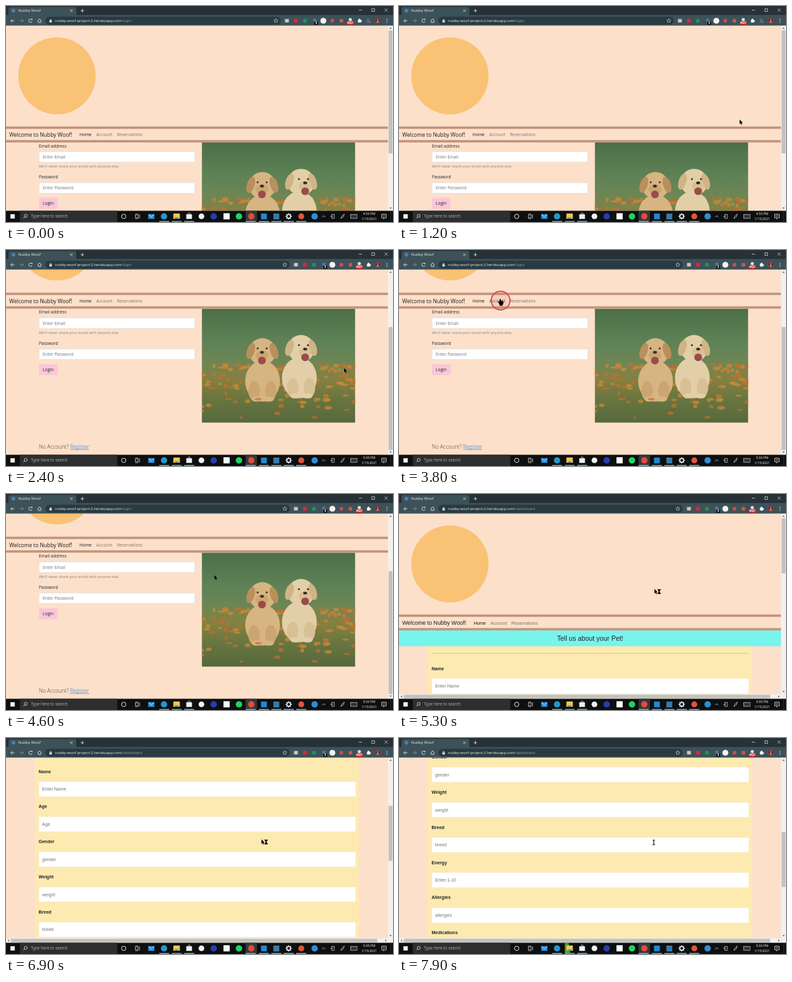
Write an HTML page with a canvas that moves like this. It is 600 px wide and 337 px high and loops after 8 s.

```html
<!DOCTYPE html>
<html lang="en">
<head>
<meta charset="utf-8">
<title>Nubby Woof</title>
<style>
html, body { margin: 0; width: 100%; height: 100%; overflow: hidden; background: #fce0ca; }
canvas { display: block; width: 600px; height: 337px; }
</style>
</head>
<body>
<canvas id="stage"></canvas>
<script>
const W = 600, H = 337, LOOP = 8000;
const canvas = document.getElementById('stage');
const ctx = canvas.getContext('2d');
const dpr = window.devicePixelRatio || 1;
canvas.width = W * dpr;
canvas.height = H * dpr;

const UI = '"Open Sans", "Noto Sans", sans-serif';
const ARIAL = '"Liberation Sans", Arial, sans-serif';
const BRAND = 'Nubby Woof';
const PAGE = '#fce0ca';
const RULE = '#c2947f';
const INK = '#212529';
const MUTED = '#6c757d';
const CHROME = '#3d5159';
const VIEW_TOP = 30.5, BAR_TOP = 319.5;

// Times of the main events, in ms
const CLOCK_AT = 1800, CLICK_AT = 3650, LOAD_AT = 4620;
const LOGIN_WHEEL = { from: 1300, gap: 160, count: 3 };
const DASH_WHEEL = { from: 5560, gap: 300, count: 8 };
const MOVES = [
  [300, 604, 260], [1000, 528, 177], [1250, 528, 177], [1900, 524, 184],
  [2700, 524, 184], [3550, 157, 77], [4000, 157, 77], [4950, 396, 148],
  [5400, 396, 148], [6500, 396, 158], [7000, 396, 158], [7500, 395, 163]
];

const clamp = v => Math.max(0, Math.min(1, v));
const ease = v => v * v * (3 - 2 * v);
function wheel({ from, gap, count }, t) {
  let sum = 0;
  for (let i = 0; i < count; i++) sum += 44 * ease(clamp((t - from - i * gap) / 140));
  return sum;
}

function pointer(t) {
  let a = MOVES[0];
  for (const b of MOVES) {
    if (t < b[0]) {
      const k = ease(clamp((t - a[0]) / (b[0] - a[0])));
      return [a[1] + (b[1] - a[1]) * k, a[2] + (b[2] - a[2]) * k];
    }
    a = b;
  }
  return [a[1], a[2]];
}

function rect(x, y, w, h, fill) {
  ctx.fillStyle = fill;
  ctx.fillRect(x, y, w, h);
}
function round(x, y, w, h, r, fill, stroke) {
  ctx.beginPath();
  ctx.roundRect(x, y, w, h, r);
  ctx.fillStyle = fill;
  ctx.fill();
  if (stroke) {
    ctx.strokeStyle = stroke;
    ctx.lineWidth = 0.5;
    ctx.stroke();
  }
}
function oval(x, y, rx, ry, fill, angle = 0) {
  ctx.beginPath();
  ctx.ellipse(x, y, rx, ry, angle, 0, Math.PI * 2);
  ctx.fillStyle = fill;
  ctx.fill();
}
const disc = (x, y, r, fill) => oval(x, y, r, r, fill);
function ring(x, y, r, color, width = 0.9) {
  ctx.beginPath();
  ctx.arc(x, y, r, 0, Math.PI * 2);
  ctx.strokeStyle = color;
  ctx.lineWidth = width;
  ctx.stroke();
}
function trace(points) {
  ctx.beginPath();
  points.forEach(([x, y], i) => i ? ctx.lineTo(x, y) : ctx.moveTo(x, y));
}
function line(points, color, width = 0.9) {
  trace(points);
  ctx.strokeStyle = color;
  ctx.lineWidth = width;
  ctx.stroke();
}
function poly(points, fill) {
  trace(points);
  ctx.fillStyle = fill;
  ctx.fill();
}
// y is the middle of the capitals
function text(str, x, y, size, color, family = UI, weight = 400, align = 'left') {
  ctx.font = `${weight} ${size}px ${family}`;
  ctx.textAlign = align;
  ctx.fillStyle = color;
  ctx.fillText(str, x, y + size * 0.36);
  return ctx.measureText(str).width;
}

function makeRandom(seed) {
  return () => (seed = (seed * 16807) % 2147483647) / 2147483647;
}

function puppy(x, y, coat, shade, ear, lean) {
  oval(x - 3 * lean, y + 46, 27, 32, coat);
  oval(x - 13, y + 61, 9, 15, shade);
  oval(x + 13, y + 61, 9, 15, shade);
  oval(x - 9, y + 74, 8, 4, coat);
  oval(x + 10, y + 74, 8, 4, coat);
  oval(x, y, 21, 21, coat);
  oval(x - 18, y - 1, 6, 13, ear, 0.3);
  oval(x + 18, y - 1, 6, 13, ear, -0.3);
  oval(x + 7 * lean, y + 6, 10, 8, shade);
  oval(x + 7 * lean, y + 14, 6, 6, '#9c4a4c');
  oval(x + 7 * lean, y + 1, 3, 2.2, '#3a2a22');
  disc(x - 7 + 4 * lean, y - 5, 1.5, '#3a2a22');
  disc(x + 7 + 4 * lean, y - 5, 1.5, '#3a2a22');
}

function photo(x, y) {
  ctx.save();
  ctx.translate(x, y);
  ctx.beginPath();
  ctx.rect(0, 0, 238, 178);
  ctx.clip();
  const g = ctx.createLinearGradient(0, 0, 0, 178);
  g.addColorStop(0, '#4b6f48');
  g.addColorStop(0.3, '#5f8256');
  g.addColorStop(0.48, '#6f8654');
  g.addColorStop(0.62, '#86803f');
  g.addColorStop(0.8, '#67753f');
  g.addColorStop(1, '#56683d');
  rect(0, 0, 238, 178, g);
  const rnd = makeRandom(71);
  const flower = low => {
    const fx = rnd() * 238, fy = low + rnd() * rnd() * 70;
    oval(fx, fy, 2 + rnd() * 4, 1.5 + rnd() * 2, rnd() < 0.5 ? 'rgba(206,138,56,.7)' : 'rgba(196,112,46,.7)');
  };
  for (let i = 0; i < 130; i++) flower(87);
  puppy(154, 62, '#e2cfa8', '#d8c096', '#d0b486', 0.9);
  puppy(94, 67, '#d6b582', '#cba670', '#b98f5c', -0.1);
  for (let i = 0; i < 22; i++) flower(140);
  ctx.restore();
}

function header(dash, hover) {
  const face = dash ? ARIAL : UI;
  const size = dash ? 7.03 : 6.65;
  const dx = dash ? 2 : 0;
  disc(79, 109, 60, '#fac274');
  rect(0, 188, 592.5, 3.7, RULE);
  rect(0, 209.2, 592.5, 3.7, RULE);
  text(`Welcome to ${BRAND}!`, 5, 201, dash ? 8.78 : 8.25, '#1c1a19', face);
  text('Home', 114 + dx, 201, size, '#1c1a19', face);
  text('Account', 140 + dx, 201, size, hover ? '#4d443d' : '#80726a', face);
  text('Reservations', 172 + dx, 201, size, '#80726a', face);
}

function input(label, y) {
  round(51.2, y, 241.6, 16.3, 1.8, '#fff', '#ced4da');
  text(label, 57, y + 8.3, 6.6, MUTED);
}

function loginPage(scroll, hover) {
  ctx.translate(0, -scroll);
  header(false, hover);
  text('Email address', 51, 218.2, 6.6, INK);
  input('Enter Email', 227.3);
  text("We'll never share your email with anyone else.", 51, 250.2, 5.8, '#82807e');
  text('Password', 51, 267, 6.6, INK);
  input('Enter Password', 275.8);
  round(51, 299.6, 29, 17, 1.8, '#fbc6d8');
  text('Login', 57, 308, 6.6, INK);
  const w = text('No Account? ', 51, 428, 8.2, '#3a3836', UI, 300);
  const link = text('Register', 51 + w, 428, 8.2, '#1f77d0', UI, 300);
  rect(51 + w, 432.2, link, 0.6, '#1f77d0');
  photo(303.5, 213);
}

const FIELDS = [
  ['Name', 'Enter Name'], ['Age', 'Age'], ['Gender', 'gender'], ['Weight', 'weight'],
  ['Breed', 'breed'], ['Energy', 'Enter 1-10'], ['Allergies', 'allergies'],
  ['Medications', 'medications']
];

function dashPage(scroll) {
  ctx.translate(0, -scroll);
  rect(45, 237, 502, 700, '#fdeab1');
  header(true, false);
  rect(0, 212.9, 592.5, 24.6, '#77f4eb');
  text('Tell us about your Pet!', 296.3, 225.2, 10.4, INK, ARIAL, 400, 'center');
  ctx.setLineDash([1, 0.9]);
  line([[50.5, 248.7], [542, 248.7]], '#a89b74', 0.8);
  ctx.setLineDash([]);
  FIELDS.forEach(([label, hint], i) => {
    const y = 272 + i * 54.8;
    text(label, 50.5, y, 7.03, INK, ARIAL, 700);
    round(51, y + 16, 491.3, 23.4, 0.8, '#fff', '#ece6d3');
    text(hint, 56, y + 27.6, 7.03, '#757575', ARIAL);
  });
}

function scrollbars(dash, scroll) {
  const foot = dash ? 312.5 : BAR_TOP;
  rect(592.5, VIEW_TOP, 7.5, BAR_TOP - VIEW_TOP, '#f1f1f1');
  const top = dash ? 38 + scroll * 0.308 : 38 + scroll * 0.677;
  rect(593.2, top, 6, dash ? 86 : 192, '#c1c1c1');
  poly([[594.4, 35.4], [598, 35.4], [596.2, 33.4]], '#505050');
  poly([[594.4, foot - 5], [598, foot - 5], [596.2, foot - 3]], '#505050');
  if (!dash) return;
  rect(0, 312.5, 592.5, 7, '#f1f1f1');
  rect(7.5, 313.2, 568, 5.6, '#c1c1c1');
  poly([[4.6, 314.2], [4.6, 317.8], [2.6, 316]], '#505050');
  poly([[588, 314.2], [588, 317.8], [590, 316]], '#505050');
}

function star(x, y, r, color) {
  const pts = [];
  for (let i = 0; i <= 10; i++) {
    const a = i * Math.PI / 5 - Math.PI / 2, q = i % 2 ? r * 0.45 : r;
    pts.push([x + q * Math.cos(a), y + q * Math.sin(a)]);
  }
  line(pts, color, 0.6);
}

function browser(dash, late) {
  const pale = '#dfe3e5';
  rect(0, 0, W, 15, '#263238');
  round(4, 1.5, 105, 16, 3, CHROME);
  rect(0, 14, W, VIEW_TOP - 14, CHROME);
  disc(11.5, 7.3, 3, '#4a7fae');
  text(BRAND, 19, 7.3, 6, '#eef1f2');
  line([[99.5, 5.4], [103.3, 9.2]], pale, 0.8);
  line([[103.3, 5.4], [99.5, 9.2]], pale, 0.8);
  line([[115.8, 7.3], [121, 7.3]], pale);
  line([[118.4, 4.7], [118.4, 9.9]], pale);
  line([[547, 6.5], [552, 6.5]], pale, 0.7);
  ctx.strokeRect(567.2, 4.2, 4.4, 4.4);
  line([[587, 4], [591.8, 8.8]], pale, 0.7);
  line([[591.8, 4], [587, 8.8]], pale, 0.7);

  line([[13, 23], [7.5, 23]], pale);
  line([[10, 20.4], [7.4, 23], [10, 25.6]], pale);
  line([[21.5, 23], [27, 23]], '#899094');
  line([[24.5, 20.4], [27.1, 23], [24.5, 25.6]], '#899094');
  ctx.beginPath();
  ctx.arc(38, 23, 2.6, 0.3, 5.5);
  ctx.strokeStyle = pale;
  ctx.lineWidth = 0.9;
  ctx.stroke();
  poly([[38.6, 21.8], [41, 21.8], [41, 19.5]], pale);
  line([[49, 23], [52, 20], [55, 23]], pale);
  line([[50, 22.5], [50, 25.7], [54, 25.7], [54, 22.5]], pale);

  const dx = late ? 0 : -14;
  round(61, 16.8, 379 + dx, 12.2, 6.1, '#293a41');
  rect(67.3, 22.4, 3.8, 3.2, pale);
  ctx.beginPath();
  ctx.arc(69.2, 22.3, 1.3, Math.PI, 0);
  ctx.stroke();
  const w = text('nubby-woof-project-2.herokuapp.com', 76, 22.9, 5.85, '#f1f3f4');
  text(dash ? '/dashboard' : '/login', 76 + w, 22.9, 5.85, '#9aa0a6');

  ctx.save();
  ctx.translate(dx, 0);
  star(432.3, 23, 3.4, pale);
  rect(446.5, 20.3, 6, 5.4, '#d3c5bd');
  disc(463.3, 23, 3.2, '#d92a2f');
  disc(477.4, 23, 3, '#159c53');
  disc(492.5, 22, 2.6, '#5d7590');
  round(492, 24.2, 6, 5, 1, '#111');
  text('0', 495, 26.8, 4.4, '#fff', UI, 700, 'center');
  disc(506, 23, 4.6, '#f4f4f4');
  disc(520, 23, 2.9, '#d4484a');
  disc(534, 23, 3, '#c65a48');
  disc(547.7, 21.3, 2.5, '#e0e0e0');
  round(542.3, 23.9, 11, 5.4, 1, '#d8232a');
  text('4421', 547.8, 26.7, 4.3, '#fff', UI, 700, 'center');
  rect(559.6, 21.2, 4.8, 4.6, '#f0f0f0');
  disc(562, 21, 1.2, '#f0f0f0');
  disc(564.6, 23.5, 1.2, '#f0f0f0');
  ctx.restore();
  if (!late) {
    for (let i = 0; i < 3; i++) line([[559.5, 21 + i * 2], [563.4 - (i > 1 ? 1 : 0), 21 + i * 2]], '#9ba1a4', 0.7);
    disc(564.3, 25, 0.9, '#9ba1a4');
  }
  disc(576.3, 23, 4.4, '#2b2426');
  ring(576.3, 23, 3.8, '#b8403f', 1.2);
  disc(576.3, 22, 1.4, '#b58f80');
  oval(576.3, 24.8, 2.2, 1.2, '#b58f80');
  for (const y of [20.5, 23, 25.5]) disc(590.7, y, 0.7, pale);
}

function envelope(x, y) {
  rect(x - 4.8, y - 3.5, 9.6, 7.4, '#2492e0');
  line([[x - 4.6, y - 3.2], [x, y + 0.8], [x + 4.6, y - 3.2]], '#d9efff', 0.8);
}

function taskbar(t, late) {
  const y = 328.2, pale = '#e6e6e6';
  rect(0, BAR_TOP, W, H - BAR_TOP, '#0d0f10');
  rect(6.8, 324.8, 6.8, 6.8, '#f2f2f2');
  rect(21.5, BAR_TOP, 151, H - BAR_TOP, '#2c2e30');
  ring(30.6, 327.4, 2.3, pale, 0.8);
  line([[29, 329.1], [27, 331.2]], pale, 0.8);
  text('Type here to search', 38.5, y, 6.25, '#b4b4b4');
  ring(182.5, y, 3.4, pale, 1);
  ctx.strokeStyle = pale;
  ctx.lineWidth = 0.7;
  ctx.strokeRect(200.5, 326, 4.4, 4.4);
  line([[207, 325], [207, 331.5]], pale, 0.8);
  line([[200.5, 324.5], [205, 324.5]], pale, 0.6);
  line([[200.5, 332], [205, 332]], pale, 0.6);

  envelope(225.3, y);
  disc(245, y, 4.9, '#2497c9');
  if (t > 7400) poly([[257, BAR_TOP], [263, BAR_TOP], [266, 336.5], [257, 336.5]], '#34a336');
  round(259.5, 323.8, 10, 8.2, 0.8, '#f3c852');
  rect(259.5, 329.3, 10, 2.7, '#e2a93a');
  rect(262.4, 329.8, 4.2, 2.2, '#4a96d0');
  rect(279.5, 325, 8.8, 7.2, '#f3f3f3');
  ctx.beginPath();
  ctx.arc(283.9, 325, 2, Math.PI, 0);
  ctx.strokeStyle = '#f3f3f3';
  ctx.stroke();
  disc(303, y, 4.4, '#f1f1f1');
  disc(322, y, 5, '#263db0');
  rect(337.2, 323.3, 9.6, 9.6, '#fafafa');
  disc(361.2, y, 5, '#1ed45f');
  rect(371.5, BAR_TOP, 17.5, 17, '#33383a');
  disc(380.3, y, 4.9, '#e34a3a');
  rect(395.4, 323.8, 9, 9, '#2388d2');
  rect(414.5, 323.8, 9.2, 9.2, '#397aa7');
  ring(438.3, y, 2.9, pale, 1.6);
  for (let i = 0; i < 8; i++) {
    const a = i * Math.PI / 4;
    disc(438.3 + 4 * Math.cos(a), y + 4 * Math.sin(a), 0.9, pale);
  }
  disc(457.8, y, 4.6, '#e5533b');
  disc(478.5, y, 5, '#2b8fd6');
  for (const x of [237.5, 276.3, 371.5, 392, 411.5, 430.5, 450]) rect(x, 335.4, 15.5, 1.6, '#55a9e0');
  rect(257, 335.4, 15.3, 1.6, '#3fbf3f');

  line([[490, 329.5], [492.5, 327], [495, 329.5]], pale, 0.8);
  ctx.strokeStyle = pale;
  ctx.lineWidth = 0.7;
  ctx.strokeRect(505, 325.2, 4, 6);
  line([[502.8, 328.2], [506.8, 328.2]], pale, 0.7);
  line([[519, 331.5], [521, 327.5], [524.5, 324.5], [523, 329], [519, 331.5]], pale, 0.7);
  ctx.strokeRect(534.3, 325.2, 9.8, 6);
  for (const row of [327, 329.3]) {
    ctx.setLineDash([1, 0.8]);
    line([[535.5, row], [543, row]], pale, 0.7);
    ctx.setLineDash([]);
  }
  text(late ? '5:00 PM' : '4:59 PM', 563, 324.3, 5.1, '#f3f3f3', UI, 400, 'center');
  text('1/15/2021', 563, 332, 5.1, '#f3f3f3', UI, 400, 'center');
  line([[582.5, 324.8], [589.5, 324.8], [589.5, 330.6], [587, 330.6], [585.5, 332.4], [585.5, 330.6], [582.5, 330.6], [582.5, 324.8]], pale, 0.8);
  for (const row of [326.7, 328.6]) line([[584, row], [588, row]], pale, 0.6);
  rect(596.3, BAR_TOP, 0.5, H - BAR_TOP, '#4a4a4a');
}

function arrow(x, y) {
  ctx.save();
  ctx.translate(x, y);
  const shape = [[0, 0], [0, 7.4], [1.7, 5.9], [2.9, 8.5], [4.1, 8], [3, 5.4], [5.2, 5.2], [0, 0]];
  poly(shape, '#000');
  line(shape, 'rgba(255,255,255,.45)', 0.3);
  ctx.restore();
}
function hourglass(x, y) {
  rect(x - 2.6, y - 3.6, 5.2, 1.2, '#000');
  rect(x - 2.6, y + 2.6, 5.2, 1.2, '#000');
  poly([[x - 2.2, y - 2.6], [x + 2.2, y - 2.6], [x + 0.6, y], [x + 2.2, y + 2.8], [x - 2.2, y + 2.8], [x - 0.6, y]], '#000');
}
function hand(x, y) {
  round(x - 1, y - 0.5, 2.1, 7, 1, '#000');
  round(x - 1, y + 2.4, 5.8, 5.4, 1.4, '#000');
  poly([[x - 3.4, y + 3.8], [x - 2.2, y + 3], [x, y + 5], [x + 4, y + 7], [x + 3.4, y + 10], [x - 0.4, y + 10]], '#000');
}
function beam(x, y) {
  line([[x, y - 3.6], [x, y + 3.6]], '#000', 1.1);
  line([[x - 1.9, y - 3.7], [x + 1.9, y - 3.7]], '#000', 0.9);
  line([[x - 1.9, y + 3.7], [x + 1.9, y + 3.7]], '#000', 0.9);
}

const overLink = t => t > 3420 && t < 4150;

function cursor(t) {
  const [x, y] = pointer(t);
  const age = t - CLICK_AT;
  if (age > 0 && age < 400) {
    ctx.globalAlpha = 1 - clamp((age - 250) / 150);
    const r = 5 + 9.5 * ease(clamp(age / 140));
    disc(157.5, 78.8, r, 'rgba(230,90,90,.12)');
    ring(157.5, 78.8, r, '#cf4443', 1.7);
    ctx.globalAlpha = 1;
  }
  if (t < 300) return;
  if (overLink(t)) hand(x, y);
  else if (t > 7400) beam(x, y);
  else {
    arrow(x, y);
    if (t > LOAD_AT) hourglass(x + 7.3, y + 4.2);
  }
}

function draw(t) {
  const dash = t >= LOAD_AT, late = t >= CLOCK_AT;
  const scroll = dash ? wheel(DASH_WHEEL, t) : Math.min(121.4, wheel(LOGIN_WHEEL, t));
  ctx.setTransform(dpr, 0, 0, dpr, 0, 0);
  rect(0, 0, W, H, PAGE);
  ctx.save();
  ctx.beginPath();
  ctx.rect(0, VIEW_TOP, 592.5, BAR_TOP - VIEW_TOP);
  ctx.clip();
  if (dash) dashPage(scroll);
  else loginPage(scroll, overLink(t));
  ctx.restore();
  scrollbars(dash, scroll);
  browser(dash, late);
  taskbar(t, late);
  cursor(t);
}

const start = performance.now();
function tick() {
  draw((performance.now() - start) % LOOP);
  requestAnimationFrame(tick);
}
tick();
</script>
</body>
</html>
```
